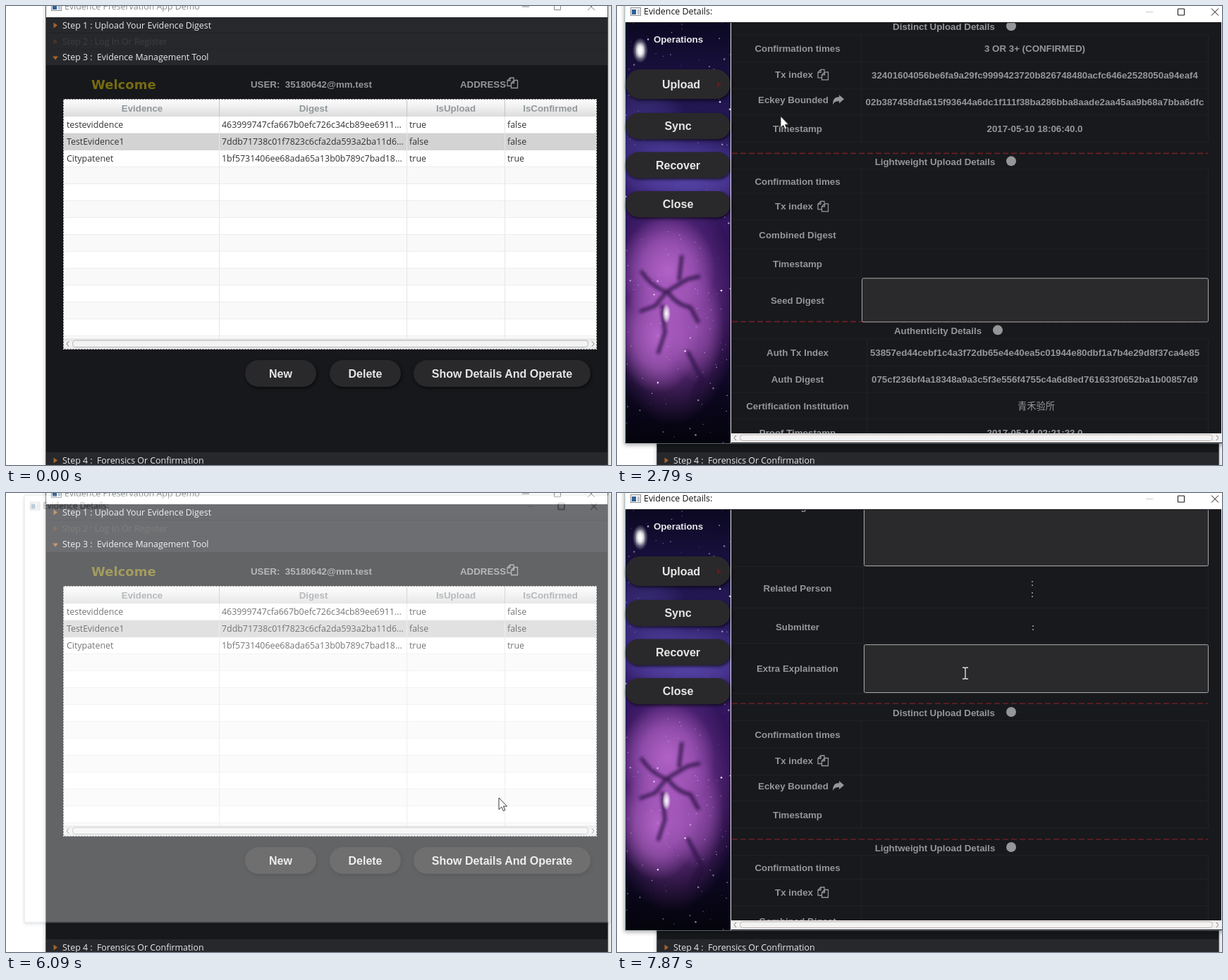
An HTML page for the animation above (7.99 s loop, 858 by 652 pixels).

```html
<!DOCTYPE html>
<html lang="en">
<head>
<meta charset="utf-8">
<title>Evidence app</title>
<style>
html, body { margin: 0; width: 100%; height: 100%; overflow: hidden; background: #fff; }
svg { display: block; width: 858px; height: 652px; }
text { white-space: pre; }
.b { font: bold 13.3px "Liberation Sans", Arial, sans-serif; fill: #949698; }
.btn { font: bold 16px "Liberation Sans", Arial, sans-serif; fill: #e6e6e6; }
.ui { font: 12.4px "Open Sans", sans-serif; fill: #333; }
.step { font: 12.4px "Open Sans", sans-serif; fill: #e9e9e9; }
.cjk { font: 13.3px "Noto Sans CJK SC", "Noto Sans CJK", sans-serif; fill: #949698; }
.hello { font: bold 18px "DejaVu Sans", sans-serif; fill: #776b10; }
.mid { text-anchor: middle; }
.lite { fill: #e8e8e8; }
.icon { fill: none; stroke: #949698; stroke-width: 1.3; }
.soft { filter: drop-shadow(0 2px 3px rgba(0,0,0,.35)); }
.pill { fill: #29292b; filter: drop-shadow(1px 2px 2px rgba(0,0,0,.65)); }
.area { fill: #2a2a2c; stroke: #a6a6a6; }
.grid { fill: none; stroke: #202225; }
.dash { stroke: #6b1f24; stroke-width: 1.6; stroke-dasharray: 8 4; }
#win { transform-origin: 441px 307px; }
</style>
</head>
<body>
<script>
const LOOP = 7990;
const text = (x, y, s, cls = 'b mid', more = '') =>
  `<text class="${cls}" x="${x}" y="${y}" dy=".355em" ${more}>${s}</text>`;
const rect = (x, y, w, h, more = '') =>
  `<rect x="${x}" y="${y}" width="${w}" height="${h}" ${more}/>`;
const path = (d, more = '') => `<path d="${d}" ${more}/>`;
const dot = (x, y, r, fill, more = '') =>
  `<circle cx="${x}" cy="${y}" r="${r}" fill="${fill}" ${more}/>`;
const blob = (x, y, rx, ry, fill, more = '') =>
  `<ellipse cx="${x}" cy="${y}" rx="${rx}" ry="${ry}" fill="${fill}" ${more}/>`;
const group = (id, body, more = '') => `<g id="${id}" ${more}>${body}</g>`;
const each = (list, fn) => list.map(fn).join('');

let seed = 7;
const rnd = () => (seed = seed * 16807 % 2147483647) / 2147483647;

const glow = (id, color, alpha) =>
  `<radialGradient id="${id}"><stop offset="0" stop-color="${color}" stop-opacity="${alpha}"/>` +
  `<stop offset=".55" stop-color="${color}" stop-opacity="${alpha * .6}"/>` +
  `<stop offset="1" stop-color="${color}" stop-opacity="0"/></radialGradient>`;
const fade = (id, colors) =>
  `<linearGradient id="${id}" x2="0" y2="1">` +
  each(colors, (c, i) => `<stop offset="${i / (colors.length - 1)}" stop-color="${c}"/>`) +
  '</linearGradient>';

const defs = `<defs>
  ${fade('head', ['#fcfcfc', '#eeeeee', '#dcdcdc'])}
  ${fade('bar', ['#e4e4e4', '#f6f6f6', '#e6e6e6'])}
  ${fade('sky', ['#0b0822', '#1a1140', '#271a5c', '#35206f', '#32145a', '#2b1150', '#1d0b3a', '#0c0720', '#04040c'])}
  ${glow('pink', '#b565c9', .95)}${glow('violet', '#8a3fa6', .9)}
  ${glow('indigo', '#6657c4', .7)}${glow('white', '#fff', 1)}${glow('sea', '#1d8ac0', 1)}
  <filter id="blur"><feGaussianBlur stdDeviation="2.2"/></filter>
  <clipPath id="side">${rect(12, 24, 149, 597)}</clipPath>
  <clipPath id="view">${rect(162, 24, 695, 583)}</clipPath>
</defs>`;

const copyIcon = (x, y) => path(
  'M10 4V1H5L1 5V12.5H6M5 1V5H1M10.5 4.5H15.5V15.5H6.5V8.5ZM10.5 4.5V8.5H6.5',
  `class="icon" transform="translate(${x} ${y})"`);
const appIcon = (x, y) =>
  rect(x + .5, y + .5, 14, 11, 'fill="#f4f4f4" stroke="#8b8f94"') +
  rect(x + 2, y + 3, 6, 7, 'fill="#2f5f95"') + rect(x + 10, y + 3, 3, 7, 'fill="#b9c4cf"');
const winButtons = (x, y, minColor) =>
  path(`M${x - 98} ${y}h10`, `stroke="${minColor}"`) +
  path(`M${x - 52.5} ${y - 4.5}h9v9h-9zM${x - 5} ${y - 5}l10 10m0-10l-10 10`, 'fill="none" stroke="currentColor"');
const pill = (x, y, w, h, s, cx = x + w / 2) =>
  rect(x, y, w, h, `rx="${h / 2}" class="pill"`) + text(cx, y + h / 2, s, 'btn mid');
const scrollBar = (x, y, w, h, stroke) =>
  rect(x, y, w, h, 'fill="url(#bar)"') +
  rect(x + 12.5, y + 2, w - 25, h - 4.5, `rx="4" fill="#f3f3f3" stroke="${stroke}"`) +
  path(`M${x + 7} ${y + h / 2 - 3.5}l-3 3.5 3 3.5M${x + w - 7} ${y + h / 2 - 3.5}l3 3.5-3 3.5`,
    'fill="none" stroke="#777"');

// Main window
const step = (y, s, open, off) =>
  rect(57, y - 11.5, 796, 22.5, 'fill="#26282c"') +
  path(open ? `M66 ${y - 1.5}h8l-4 5z` : `M67.5 ${y - 4}v8l5.5-4z`, `fill="${off ? '#4f3520' : '#a8642a'}"`) +
  text(80, y, s, 'step', off ? 'style="fill:#403f3e"' : '');

const cells = [
  ['testeviddence', '463999747cfa667b0efc726c34cb89ee6911...', 'true', 'false'],
  ['TestEvidence1', '7ddb71738c01f7823c6cfa2da593a2ba11d6...', 'false', 'false'],
  ['Citypatenet', '1bf5731406ee68ada65a13b0b789c7bad18...', 'true', 'true']
];
const colX = [86, 306, 572, 711];
let rows = '';
for (let i = 0; i < 14; i++) {
  const y = 157 + i * 24, h = i < 13 ? 24 : 4;
  rows += rect(82, y, 756, h, `fill="${i % 2 ? '#f9f9f9' : '#fff'}"`) +
    path(`M82 ${y + h - .5}H838`, 'stroke="#ededed"');
}
const table = rows +
  group('pick', rect(82, 157, 756, 24, 'fill="#d3d3d3"')) +
  each([303, 569, 708], x => path(`M${x - .5} 157V473`, 'stroke="#e6e6e6"')) +
  rect(82, 133, 756, 24, 'fill="url(#head)"') +
  each([303, 569, 708], x => path(`M${x - .5} 133V157`, 'stroke="#c4c4c4"')) +
  each([[193, 'Evidence'], [436, 'Digest'], [638, 'IsUpload'], [772, 'IsConfirmed']],
    ([x, s]) => text(x, 145.5, s, 'b mid', 'style="fill:#92989b"')) +
  each(cells, (r, i) => each(r, (s, j) => text(colX[j], 169 + i * 24, s, 'ui'))) +
  scrollBar(82, 473, 756, 14, '#b5b5b5') +
  rect(81.5, 132.5, 756, 355, 'fill="none" stroke="#eee"') +
  rect(81.5, 132.5, 756, 355, 'fill="none" stroke="#555" stroke-dasharray="2 2"');

const main =
  rect(57, -20, 797, 700, 'fill="#fff" class="soft"') +
  rect(57, 16, 796, 640, 'fill="#16181b"') +
  group('mainTitle', appIcon(64, -5) +
    text(83, 1, 'Evidence Preservation App Demo', 'ui', 'style="fill:currentColor"') +
    winButtons(830, 1, 'currentColor')) +
  step(27.5, 'Step 1 : Upload Your Evidence Digest') +
  step(50.5, 'Step 2 : Log In Or Register', false, true) +
  step(73, 'Step 3 :&#160; Evidence Management Tool', true) +
  step(645.5, 'Step 4 :&#160; Forensics Or Confirmation') +
  group('mainEdge', path('M56.5 0V652M853.5 0V652', 'stroke="currentColor"')) +
  text(121, 111.5, 'Welcome', 'hello') +
  text(347, 111, 'USER:&#160; 35180642@mm.test', 'b') +
  text(644, 111, 'ADDRESS', 'b') + copyIcon(710, 101) + table +
  pill(339, 503, 101, 38, 'New') + pill(459, 503, 101, 38, 'Delete') +
  pill(578, 503, 251, 38, 'Show Details And Operate');

// Side panel
let stars = '';
for (let i = 0; i < 190; i++) {
  const big = rnd() < .12;
  stars += dot((12 + rnd() * 149).toFixed(1), (24 + rnd() * 597).toFixed(1),
    big ? 1.3 : .4 + rnd() * .5, big ? '#f3e4ff' : '#b99be0', `opacity="${(.4 + rnd() * .6).toFixed(2)}"`);
}
const sky = rect(12, 24, 149, 597, 'fill="url(#sky)"') +
  blob(100, 240, 95, 60, 'url(#indigo)') + blob(40, 180, 60, 90, 'url(#indigo)', 'opacity=".5"') +
  blob(78, 430, 95, 165, 'url(#violet)') + blob(72, 375, 68, 78, 'url(#pink)') +
  blob(58, 470, 58, 80, 'url(#pink)') + blob(112, 455, 40, 80, 'url(#pink)', 'opacity=".6"') +
  path('M34 376q14 22 36 30l30-18 18-4M70 406l-16 20-22 8M72 406q12 18 32 22l12 22M64 424l4 40-10 30M88 390l4-36M100 490l20 40-12 26',
    'fill="none" stroke="#26103f" stroke-width="5" opacity=".8" filter="url(#blur)"') +
  blob(70, 437, 6, 14, 'url(#white)') + stars +
  blob(33, 63, 11, 18, 'url(#white)', 'opacity=".8"') + blob(33, 63, 5, 9, '#fff', 'filter="url(#blur)"');

const side = `<g clip-path="url(#side)">${sky}</g>` +
  text(87, 47, 'Operations', 'b mid lite') +
  pill(12, 90, 149, 42, 'Upload', 91) + path('M142 107.5v8l6.500-4z', 'fill="#67191d"') +
  each([[152, 'Sync'], [207.5, 'Recover'], [263, 'Close']], ([y, s]) => pill(12, y, 149, 37, s)) +
  path('M161.5 24V621', 'stroke="#e9e9e9"');

// Scrolling details
const labels = [
  [37, 'Name'], [72, 'Inner Digest'], [106, 'Final Digest'], [140, 'Produce Date'], [174, 'Type'],
  [275, 'Usage'], [391, 'Related Person'], [446, 'Submitter'], [505, 'Extra Explaination'],
  [599, 'Confirmation times'], [636, 'Tx index', 251], [672, 'Eckey Bounded', 250], [713, 'Timestamp'],
  [788, 'Confirmation times'], [823, 'Tx index', 251], [864, 'Combined Digest'], [905, 'Timestamp'],
  [957, 'Seed Digest'], [1031, 'Auth Tx Index'], [1069, 'Auth Digest'],
  [1107, 'Certification Institution'], [1145, 'Proof Timestamp']
];
const titles = [
  [568, 463.5, 'Distinct Upload Details', 559], [760, 451, 'Lightweight Upload Details', 559],
  [1000, 455, 'Authenticity Details', 540], [1178, 478.5, 'Evidence Chain Structure']
];
const grids = [
  [349.5, 24, [55, 89, 123, 157, 191, 361, 420, 470, 541]], [346.5, 580, [580, 619, 657, 694, 732]],
  [346.5, 771, [771, 805, 843, 884, 925]], [354.5, 1012, [1012, 1050, 1088, 1126, 1164]]
];
const values = list => each(list, ([y, s]) => text(592.5, y, s));
const first = values([
  [37, 'Citypatenet'],
  [72, '18188c227950a4230f00e3ace38a5c0c132faf86754b315cc15cee0d0ecfbd92'],
  [106, '1bf5731406ee68ada65a13b0b789c7bad187661cbfe3a7a5160a8fc65283359c'],
  [140, '2011.01.05'], [174, 'fadadfa'], [599, '3 OR 3+ (CONFIRMED)'],
  [637, '32401604056be6fa9a29fc9999423720b826748480acfc646e2528050a94eaf4'],
  [675, '02b387458dfa615f93644a6dc1f111f38ba286bba8aade2aa45aa9b68a7bba6dfc'],
  [713, '2017-05-10 18:06:40.0'],
  [1031, '53857ed44cebf1c4a3f72db65e4e40ea5c01944e80dbf1a7b4e29d8f37ca4e85'],
  [1069, '075cf236bf4a18348a9a3c5f3e556f4755c4a6d8ed761633f0652ba1b00857d9'],
  [1145, '2017-05-14 02:21:23.0']
]) + text(594.5, 1107, '青禾验所', 'cjk mid') + text(359, 203.500, '1221213131121', 'b lite');
const second = values([
  [37, 'TestEvidence1'],
  [72, '5c02e7719ab3408dd16fe2940b7ac358812d6e90f4a17b35c8069d2ee41ba703'],
  [106, '7ddb71738c01f7823c6cfa2da593a2ba11d6508e3c94b7f2016ad58e97c3041b'],
  [140, '2011.01.05'], [174, 'test']
]);

// Node picture: concentric rings of dots on a sphere
const net = () => {
  const cx = 361, cy = 1247;
  let lines = '', dots = '';
  [[16, 6], [31, 11], [42, 18], [47, 22]].forEach(([r, n], k) => {
    for (let i = 0; i < n; i++) {
      const a = i / n * 6.283 + k * .7;
      const x = (cx + r * Math.cos(a) * 1.02).toFixed(1), y = (cy + r * Math.sin(a) * .8).toFixed(1);
      if (k < 2 && i % 2 === 0) lines += `M${cx} ${cy}L${x} ${y}`;
      dots += blob(x, y, 3.3 - k * .6, 2.9 - k * .5, '#f0b32a');
    }
  });
  return rect(307, 1207, 105, 84, 'fill="#08305f"') + blob(360, 1248, 62, 52, 'url(#sea)') +
    path(lines, 'stroke="#c9a34a" stroke-width=".7"') + dots + dot(363, 1246, 5, '#f7b422');
};
const chain = path('M244 1254H307M412 1229H475V1279', 'fill="none" stroke="#7d7f81"') +
  dot(244, 1254, 9, '#1e90ff') + dot(475, 1229, 10, '#008000') + dot(475, 1279, 10, '#008000') + net() +
  rect(163.5, 1190.5, 673, 123, 'fill="none" stroke="#e4e4e4" stroke-dasharray="2 2"');

const area = (x, y, h) => rect(x + .5, y + .5, 838 - x, h, 'rx="2" class="area"');
const details =
  each(grids, ([x, top, ys]) => path(
    ys.map(y => `M163 ${y - .5}H838`).join('') + `M${x} ${top}V${ys[ys.length - 1]}M838.5 ${top}V${ys[ys.length - 1]}`,
    'class="grid"')) +
  each([555, 748, 987, 1164], y => path(`M163 ${y}H838`, 'class="dash"')) +
  area(350, 191, 168) + area(350, 471, 68) + area(347, 925, 62) +
  each(labels, ([y, s, x = 256]) => text(x, y, s)) +
  each(titles, ([y, x, s, mark]) => text(x, y, s) + (mark ? dot(mark, y - 1, 7, '#949698') : '')) +
  each([[589, 384], [589, 400.5], [590, 447]], ([x, y]) => text(x, y - 1, ':')) +
  copyIcon(284, 628) + copyIcon(284, 815) +
  path('M322 671L315 665V668C309 668 306 671 306 679C308 675 310 674 315 674V677Z', 'fill="#949698"') +
  group('first', first) + group('second', second) + chain;

const win =
  rect(11, -8, 860, 629, 'fill="#fff" stroke="#9fb4c0" class="soft"') +
  group('winTitle', appIcon(19, 2) +
    text(38, 8, 'Evidence Details:', 'ui', 'style="fill:currentColor"') + winButtons(848, 8.5, '#c9c9c9')) +
  group('winBody', rect(12, 23, 846, 598, 'fill="#18191c"') + side +
    `<g clip-path="url(#view)">${group('roll', details)}</g>` +
    scrollBar(162, 607, 695, 13, '#c3b3ae') + rect(857, 23, 14, 597, 'fill="#f2f2f2"'));

const pointer =
  group('arrow', path('M0 0V16.500L3.800 13 6.300 18.600 8.800 17.500 6.400 12H11.500Z', 'fill="#fff" stroke="#222" stroke-width=".9"')) +
  group('beam', path('M-4 -8h3l1 1 1-1h3M0 -7V7M-4 8h3l1-1 1 1h3', 'fill="none" stroke="#dedede" stroke-width="1.4"'));

// A track is a list of [time, declarations, steps towards the next entry]
let css = '';
const track = (id, list) => {
  const keys = each(list, ([t, decl, n = 1]) =>
    `${(t / LOOP * 100).toFixed(4)}%{${decl};animation-timing-function:steps(${n})}`);
  css += `@keyframes ${id}{${keys}}#${id}{animation:${id} ${LOOP}ms infinite}`;
};
const show = v => `opacity:${v}`;
const color = c => `color:${c}`;
const move = (x, y) => `transform:translate(${x}px,${y}px)`;
const pose = (o, s) => `opacity:${o};transform:scale(${s})`;

track('pick', [[0, move(0, 24)], [100, move(0, 48)], [5100, move(0, 24)]]);
track('mainTitle', [[0, color('#8a8a8a')], [100, color('#111')], [520, color('#8a8a8a')],
  [4540, color('#111')], [5850, color('#8a8a8a')]]);
track('mainEdge', [[0, color('#55585c')], [100, color('#2f7fb5')], [520, color('#55585c')],
  [4540, color('#2f7fb5')], [5850, color('#55585c')]]);
track('win', [[0, pose(0, .965)], [520, pose(.33, .965)], [640, pose(1, 1)], [4660, pose(.6, .97)],
  [4780, pose(.2, .94)], [4890, pose(0, .94)], [6090, pose(.33, .965)], [6200, pose(1, 1)]]);
track('winBody', [[0, show(0)], [700, show(1)], [5000, show(0)], [6250, show(1)]]);
track('winTitle', [[0, color('#111')], [4540, color('#8c8c8c')], [5000, color('#111')]]);
track('first', [[0, show(1)], [5500, show(0)]]);
track('second', [[0, show(0)], [5500, show(1)]]);
track('roll', [
  [0, 0], [1300, 0, 3], [1640, 110], [1750, 110, 3], [2090, 347, 4], [2570, 500, 6], [3240, 732],
  [5700, 0], [6310, 0, 4], [6750, 226, 3], [7100, 400], [7200, 400, 6], [7870, 256]
].map(([t, y, n]) => [t, move(0, -y), n]));
track('pointer', [
  [0, 640, 212], [100, 640, 212, 2], [290, 735, 518], [520, 735, 518, 7], [1300, 340, 180],
  [1750, 340, 180, 3], [2090, 345, 183], [2570, 345, 183, 2], [2800, 119, 130, 6], [3450, 644, 34],
  [3660, 644, 34, 8], [4540, 845, 12, 5], [5100, 790, 190, 3], [5440, 816, 349, 2], [5620, 735, 520],
  [5740, 735, 520, 3], [6090, 699, 433, 5], [6640, 482, 261], [7200, 482, 261, 6], [7870, 494, 256]
].map(([t, x, y, n]) => [t, move(x, y), n]));
track('arrow', [[0, show(0)], [100, show(1)], [3570, show(0)], [3770, show(1)], [6640, show(0)]]);
track('beam', [[0, show(0)], [6640, show(1)]]);

document.head.insertAdjacentHTML('beforeend', `<style>${css}</style>`);
document.body.innerHTML =
  `<svg viewBox="0 0 858 652" xmlns="http://www.w3.org/2000/svg">${defs}${main}${group('win', win)}${group('pointer', pointer)}</svg>`;
</script>
</body>
</html>
```
